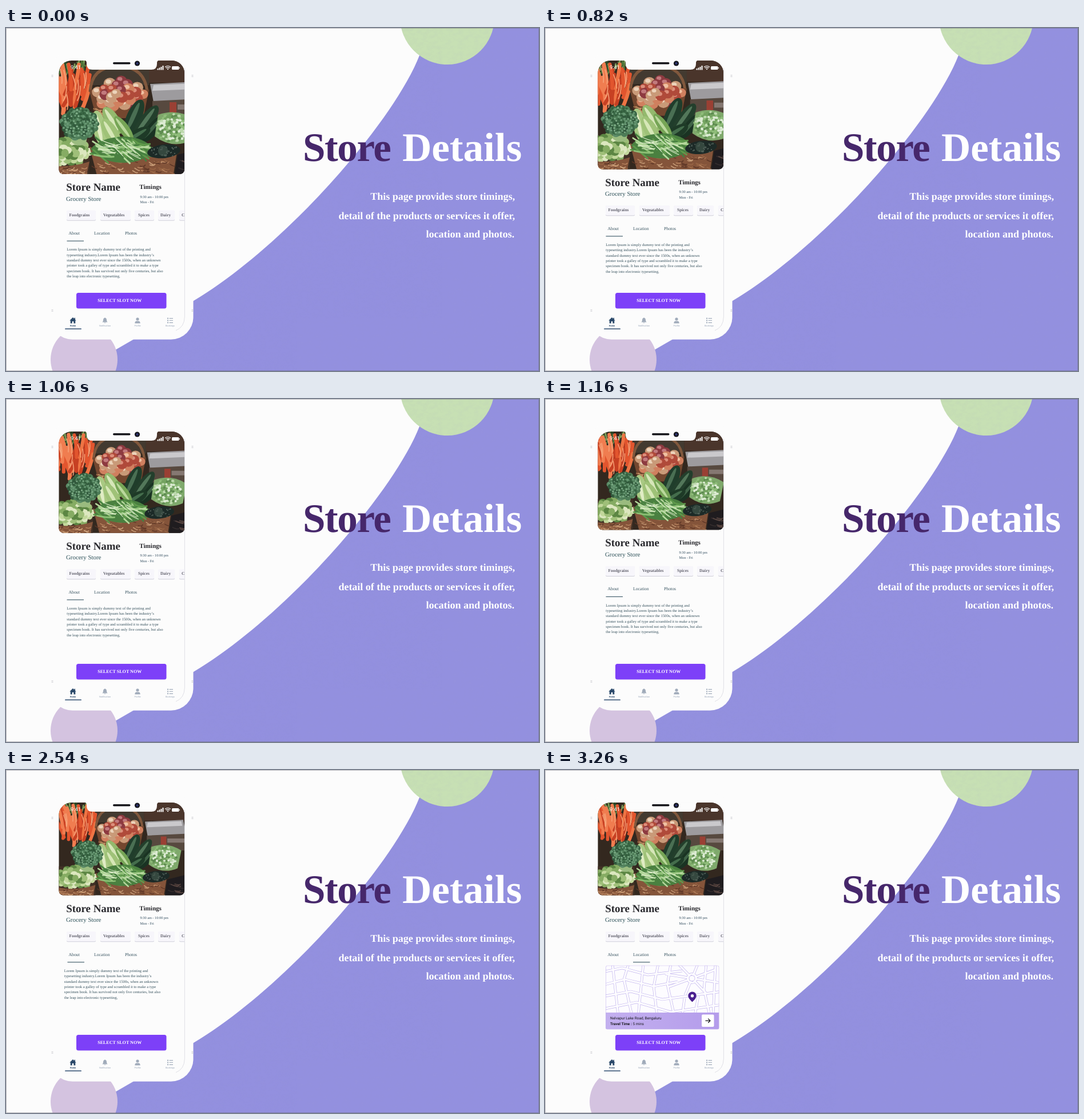
An HTML page for the animation above (6000 ms loop, 932 px wide and 601 px high).

```html
<!DOCTYPE html>
<html lang="en">
<head>
<meta charset="utf-8">
<title>Store Details</title>
<style>
  html, body { margin: 0; width: 100%; height: 100%; overflow: hidden; background: #fcfcfc; }
  svg { display: block; width: 932px; height: 601px; }
  text { font-family: "Liberation Serif", "Times New Roman", serif; text-rendering: geometricPrecision; white-space: pre; }
  .b { font-weight: 700; }
  .sans { font-family: Roboto, Inter, sans-serif; }
  .title { font-size: 71px; font-weight: 700; }
  .lead { font-size: 18px; font-weight: 700; fill: #fff; text-anchor: end; }
  .hours { font-size: 6.25px; fill: #2f4a5c; }
  .chip { font-size: 7.45px; font-weight: 700; fill: #62626d; }
  .tab { font-size: 7.75px; fill: #36525f; }
  .body { font-size: 6.67px; fill: #35505c; }
  .nav { font: 3.9px Roboto, Inter, sans-serif; fill: #98a5b8; text-anchor: middle; }
</style>
</head>
<body>
<svg viewBox="0 0 932 601" xmlns="http://www.w3.org/2000/svg">
  <defs>
    <clipPath id="photoClip"><path id="photoEdge"/></clipPath>
    <clipPath id="screenClip"><rect x="92.5" y="57" width="219.5" height="400"/></clipPath>
    <clipPath id="mapClip"><rect x="106" y="342.5" width="198.5" height="112" rx="3"/></clipPath>
    <clipPath id="roadClip"><rect x="106" y="342.5" width="198.5" height="82.5"/></clipPath>
    <clipPath id="tintClip"><use href="#sweep"/><use href="#sun"/></clipPath>
    <linearGradient id="panel"><stop stop-color="#c3b0ef"/><stop offset="1" stop-color="#b49ceb"/></linearGradient>
    <filter id="grain" x="0" y="0" width="100%" height="100%">
      <feTurbulence type="fractalNoise" baseFrequency=".11 .16" numOctaves="3" seed="4"/>
      <feColorMatrix values="0 0 0 0 .35  0 0 0 0 .33  0 0 0 0 .6  .5 0 0 0 -.2"/>
    </filter>
  </defs>

  <rect width="932" height="601" fill="#fcfcfc"/>
  <path id="sweep" fill="#9390df" d="M742 0Q734 24 723 48C677 166 486 384 328 478Q260 525 193 563L120 601H932V0Z"/>
  <circle id="sun" cx="771.5" cy="-18.5" r="82.5" fill="#c7e0b4"/>
  <rect x="120" width="812" height="601" filter="url(#grain)" clip-path="url(#tintClip)" opacity=".3"/>
  <circle cx="136.5" cy="581" r="58.5" fill="#d4c3e0"/>
  <rect x="77" y="40" width="250.5" height="505.7" rx="39" fill="#fcfcfc"/>
  <rect x=".5" y=".5" width="931" height="600" fill="none" stroke="#60606c" stroke-opacity=".45"/>

  <text class="title" x="519" y="233" fill="#46276b" letter-spacing="-1.4">Store</text>
  <text class="title" x="693" y="233" fill="#fff">Details</text>
  <text class="lead" x="890" y="301">This page provides store timings,</text>
  <text class="lead" x="890" y="335">detail of the products or services it offer,</text>
  <text class="lead" x="889" y="366.5">location and photos.</text>

  <g id="marks" stroke="#c9c9cf" stroke-width=".7"></g>
  <path d="M312.4 70V506Q312 524 297 530" fill="none" stroke="#dcdce3" stroke-width=".9"/>

  <g clip-path="url(#photoClip)"><g id="photo"></g></g>

  <path fill="#fcfcfc" d="M137 56.5Q141 57 141 61V63Q141 73 151 73H254Q264 73 264 63V61Q264 57 268 56.5Z"/>
  <rect x="187" y="60" width="30.5" height="3.5" rx="1.75" fill="#15151a"/>
  <circle cx="229.5" cy="62" r="4.6" fill="#15161f"/><circle cx="229.5" cy="62" r="2.1" fill="#2d3470"/>
  <text class="sans" x="113" y="71.5" font-size="9.3" fill="#fff">9:41</text>
  <g fill="#fff">
    <path d="M264.5 71h2v2.500h-2zM267.500 69.500h2v4h-2zM270.500 68h2v5.500h-2zM273.500 66h2v7.500h-2z"/>
    <rect x="290" y="67" width="12.500" height="6" rx="1.500"/><rect x="303" y="69" width="1" height="2"/>
    <path d="M281.400 71.500L283 73.500L284.600 71.500Q283 70.300 281.400 71.500Z"/>
    <path d="M278 68.500Q283 64.500 288 68.500M279.800 70.300Q283 67.800 286.200 70.300" fill="none" stroke="#fff" stroke-width="1.200"/>
  </g>

  <g clip-path="url(#screenClip)">
    <g id="scroll">
      <text class="b" x="105.300" y="285" font-size="18.900" fill="#29292e">Store Name</text>
      <text x="105" y="302.500" font-size="10.900" fill="#2c5058">Grocery Store</text>
      <text class="b" x="233.300" y="282" font-size="11.100" fill="#29292e">Timings</text>
      <text class="hours" x="234.500" y="297.500">9:30 am - 10:00 pm</text>
      <text class="hours" x="234.500" y="307">Mon - Fri</text>
      <g id="chips"></g>
      <text class="tab" x="109.500" y="362">About</text>
      <text class="tab" x="154" y="362">Location</text>
      <text class="tab" x="208" y="362">Photos</text>
      <rect id="underline" x="106.500" y="372.600" width="29.500" height="1.200" fill="#46626f"/>
      <g id="about"></g>
    </g>
    <g id="location"><g clip-path="url(#mapClip)">
      <rect x="106" y="342.500" width="198.500" height="112" fill="#fdfcff"/>
      <g id="roads" fill="none" clip-path="url(#roadClip)"></g>
      <path d="M257.500 406.500Q250.300 400 250.300 395.700A7.200 7.200 0 0 1 264.700 395.700Q264.700 400 257.500 406.500Z" fill="#4a1f8f"/>
      <circle cx="257.500" cy="395.800" r="2.700" fill="#fff"/>
      <rect x="106" y="425" width="198.500" height="29.500" fill="url(#panel)"/>
      <rect x="106.300" y="342.800" width="197.900" height="111.400" rx="3" fill="none" stroke="#c3b4ee" stroke-width=".7"/>
      <text class="sans" x="114" y="436.500" font-size="6.500" fill="#18181c">Nelvapur Lake Road, Bengaluru</text>
      <text class="sans" x="114" y="447" font-size="6.500" fill="#18181c"><tspan font-weight="600">Travel Time : </tspan>5 mins</text>
      <rect x="274" y="428.500" width="21.500" height="21.500" rx="2" fill="#fff"/>
      <path d="M280.500 439.300H288.700M285.200 435.600L288.900 439.300L285.200 443" fill="none" stroke="#18181c" stroke-width="1.300"/>
    </g></g>
  </g>

  <rect x="123" y="464" width="157.500" height="27.500" rx="3.500" fill="#7d40f8"/>
  <text class="b" x="198.700" y="480.400" font-size="8.050" fill="#fff" text-anchor="middle">SELECT SLOT NOW</text>

  <path d="M111.300 512.500L117 507L119.500 509.400V507.800H121V510.900L122.700 512.500H121.300V517.500H118.300V514H115.700V517.500H112.700V512.500Z" fill="#2c4a6b"/>
  <g fill="#a0abba">
    <path d="M168.500 515.500Q170 514 170 511.500Q170 508.200 173 507.500Q176 508.200 176 511.500Q176 514 177.500 515.500ZM171.600 516.200H174.400Q173 518.500 171.600 516.200Z"/>
    <circle cx="230" cy="510" r="2.600"/>
    <path d="M225.300 517.500Q225.300 513.400 228.500 513.400H231.500Q234.700 513.400 234.700 517.500Z"/>
    <path d="M282 507.800h2v2h-2zM282 511.500h2v2h-2zM282 515.300h2v2h-2zM285.500 508.200h6.500v1.200h-6.500zM285.500 511.900h6.500v1.200h-6.500zM285.500 515.700h6.500v1.200h-6.500z"/>
  </g>
  <text class="nav" x="117" y="522.600" style="fill:#2c4a6b;font-weight:700">Home</text>
  <text class="nav" x="173" y="522.600">Notification</text>
  <text class="nav" x="230" y="522.600">Profile</text>
  <text class="nav" x="287" y="522.600">Bookings</text>
  <rect x="103" y="526.400" width="29" height="1.700" rx=".8" fill="#2f4d70"/>
</svg>
<script>
const $ = id => document.getElementById(id);
let seed = 7;
const rnd = () => (seed = seed * 16807 % 2147483647) / 2147483647;
const between = (a, b) => a + (b - a) * rnd();
const pick = list => list[Math.floor(rnd() * list.length)];

const path = (d, fill, extra = '') => `<path d="${d}" fill="${fill}" ${extra}/>`;
const oval = (x, y, rx, ry, fill, turn = 0) =>
  `<ellipse cx="${x}" cy="${y}" rx="${rx}" ry="${ry}" fill="${fill}" transform="rotate(${turn} ${x} ${y})"/>`;
const many = (n, make) => Array.from({ length: n }, (_, i) => make(i)).join('');

// Round things scattered inside an ellipse, from the rim to the middle.
const heap = (x, y, rx, ry, n, r, colors) => many(n, i => {
  const a = i * 2.4, q = Math.sqrt(1 - (i + .5) / n);
  return oval(x + rx * q * Math.cos(a), y + ry * q * Math.sin(a), r * between(.8, 1.2), r * between(.75, 1.1), pick(colors));
});
// Long thin things scattered in a box, lying at about one angle.
const sticks = (n, x0, x1, y0, y1, len, angle, spread, width, colors) => many(n, () => {
  const a = (angle + between(-spread, spread)) * Math.PI / 180, x = between(x0, x1), y = between(y0, y1);
  const dx = Math.cos(a) * len / 2, dy = Math.sin(a) * len / 2;
  return path(`M${x - dx} ${y - dy}Q${x + 3} ${y + 3} ${x + dx} ${y + dy}`, 'none',
    `stroke="${pick(colors)}" stroke-width="${width}" stroke-linecap="round"`);
});
const gourd = (x, y, rx, ry, turn, dark, light) =>
  oval(x, y, rx, ry, dark, turn) + oval(x - 1.5, y - 1, rx * .3, ry * .8, light, turn);
const bulb = (x, y, r, dark, light) =>
  oval(x, y, r, r * .92, dark) + oval(x - r * .25, y - r * .3, r * .45, r * .35, light);
const basket = (d, x0, x1, y0, y1) => path(d, '#84543a') +
  sticks(46, x0, x1, y0, y1, 9, 8, 22, 1.6, ['#b98560', '#5d3626', '#cda27c', '#9a6746']);

function drawPhoto() {
  const fruit = [['#b04a3a', '#dc8f7c'], ['#d0805f', '#efc0a2'], ['#8d3a40', '#c27a7d'], ['#c99a78', '#ecd3ba']];
  $('photo').innerHTML =
    path('M60 50H345V262H60Z', '#33281f') +
    path('M140 57H250V100H140Z', '#433a30') + path('M250 57H345V96H250Z', '#4a352b') +
    sticks(20, 64, 140, 56, 82, 20, 70, 50, 3, ['#4f7338', '#7d9c58', '#2e4b29']) +
    sticks(18, 70, 104, 84, 128, 44, 78, 14, 7, ['#e2552e', '#cb4325', '#f07d50']) +
    sticks(16, 108, 142, 82, 126, 44, 98, 16, 6.5, ['#e2552e', '#c74023', '#ee7444']) +
    sticks(12, 76, 140, 84, 130, 26, 86, 16, 1.6, ['#f7a67c']) +
    path('M147 112Q150 66 196 68Q242 66 247 112', 'none', 'stroke="#80583d" stroke-width="5"') +
    path('M145 108H250L240 158H158Z', '#74472f') +
    many(26, i => {
      const a = i * 2.4, q = Math.sqrt(1 - (i + .5) / 26);
      return bulb(198 + 42 * q * Math.cos(a), 116 + 25 * q * Math.sin(a), between(8, 11), ...pick(fruit));
    }) +
    sticks(24, 156, 190, 142, 154, 10, 5, 15, 2, ['#a97650', '#5b3624', '#c39668']) +
    path('M252 98L334 94L340 126L258 130Z', '#9d9b9e') + path('M258 100L330 97L332 107L256 110Z', '#cac9cc') +
    path('M256 128L340 124V160H256Z', '#57493f') + path('M286 130h12v18h-12z', '#9a4034') +
    path('M300 134H340V143H300Z', '#857872') +
    gourd(224, 156, 13, 33, 24, '#203d2b', '#4a6f53') + gourd(245, 164, 12, 34, 36, '#233f2c', '#53775a') +
    gourd(258, 176, 10, 30, 40, '#1a3323', '#3f6247') + gourd(228, 190, 11, 28, 58, '#1e3a27', '#446d4c') +
    gourd(186, 162, 12, 27, -32, '#93b96d', '#d6e6b9') + gourd(164, 176, 12, 32, -12, '#a9c983', '#e0ecc4') +
    gourd(184, 184, 12, 28, -30, '#9fc278', '#d6e7b7') + gourd(206, 176, 9, 26, -36, '#76a556', '#bad89c') +
    path('M266 152Q300 140 330 160L322 198Q290 212 260 190Z', '#7fa96c') +
    heap(291, 175, 28, 24, 110, 2.8, ['#8fbd7a', '#bddaad', '#5e8c50', '#dcebd3', '#74a361']) +
    path('M60 194H146V262H60Z', '#403025') +
    heap(103, 217, 42, 22, 54, 7, ['#86ac63', '#c2d79b', '#5c8643', '#dce7bf', '#9fbf79']) +
    basket('M60 238Q105 248 146 234L140 262H60Z', 66, 140, 244, 256) +
    path('M116 178L145 180L139 204Q125 209 115 200Z', '#9abb7f') +
    heap(128, 168, 29, 25, 80, 6.500, ['#3b6846', '#4d7c57', '#31583c', '#5b8b66']) +
    heap(128, 166, 31, 25, 90, 1.800, ['#6a9a76', '#315c3b', '#7cab85']) +
    basket('M146 208Q220 238 300 210L292 262H160Z', 154, 294, 232, 254) +
    path('M148 212Q164 192 206 190Q246 192 258 214Q240 238 200 236Q166 234 148 212Z', '#4a8040') +
    sticks(44, 164, 242, 199, 227, 34, 20, 34, 3, ['#5f9a4b', '#8fc077', '#b5d89c', '#467f40']) +
    sticks(16, 168, 238, 200, 224, 24, 20, 30, 1.200, ['#dcecca']) +
    gourd(276, 216, 29, 12, -6, '#1c2a27', '#35483f') +
    many(36, () => oval(between(254, 299), between(208, 225), 1.200, .9, '#53635b')) +
    path('M300 222L340 212V262H294Z', '#1f1c1f') +
    sticks(10, 304, 330, 230, 250, 12, 8, 10, 2, ['#57443f', '#332c2d']);
}

function drawDetails() {
  $('marks').innerHTML = [[81, 84], [326, 84], [81, 495], [326, 495]].map(([x, y]) =>
    path(`M${x - 1.5} ${y - 1.5}h3M${x - 1.5} ${y}h3M${x - 1.5} ${y + 1.5}h3`, 'none')).join('');

  const chips = [['Foodgrains', 106, 51, 110.5], ['Vegeatables', 165, 53, 170], ['Spices', 225, 34, 231],
    ['Dairy', 266, 29, 270], ['C', 303, 30, 307]];
  $('chips').innerHTML = chips.map(([label, x, w, tx]) =>
    `<rect x="${x}" y="320.5" width="${w}" height="17.2" rx="2" fill="#cfcfd9"/>` +
    `<rect x="${x}" y="319.5" width="${w}" height="17.2" rx="2" fill="#f7f6fb"/>` +
    `<text class="chip" x="${tx}" y="329.7">${label}</text>`).join('');

  const lines = ['Lorem Ipsum is simply dummy text of the printing and',
    'typesetting industry.Lorem Ipsum has been the industry’s',
    'standard dummy text ever since the 1500s, when an unknown',
    'printer took a galley of type and scrambled it to make a type',
    'specimen book. It has survived not only five centuries, but also',
    'the leap into electronic typesetting,'];
  $('about').innerHTML = lines.map((line, i) =>
    `<text class="body" x="106.3" y="${390.3 + i * 9.35}">${line}</text>`).join('');

  const streets = 'M100 354L135 347L180 359L240 352M100 377L140 367L190 379L232 371M100 397L150 388L205 402L310 388' +
    'M100 419L160 407L220 424L310 411M118 340L128 430M146 340L138 367L152 430M172 340L163 430' +
    'M198 340L190 379L196 430M220 340L214 376L226 430M282 340L278 384L288 430M298 340L294 430M244 400L240 430M268 396L262 430';
  const spokes = many(8, i => {
    const a = i * Math.PI / 4 + .25;
    return `M257 365l${Math.cos(a) * 48} ${Math.sin(a) * 30}`;
  });
  const ring = '<circle cx="257" cy="365" r="7.5"/>';
  const layer = (color, width) =>
    `<g stroke="${color}" stroke-width="${width}"><path d="${streets}${spokes}"/>${ring}</g>`;
  $('roads').innerHTML = layer('#c3b6ee', 4.6) + layer('#fdfcff', 3.2) +
    '<circle cx="257" cy="365" r="5" fill="#fdfcff" stroke="#c3b6ee" stroke-width=".8"/>';
}

const LOOP = 6000, STEP = 20, LIFT = 36.5, PAGE = 220, TAB_GAP = 47.5;
const progress = (t, start, end) => Math.min(1, Math.max(0, (t - start) / (end - start)));
const shift = (id, x, y) => $(id).setAttribute('transform', `translate(${x} ${y})`);

function render(time) {
  // The small lead absorbs clock rounding at the step edges.
  const t = Math.floor((time + 2) % LOOP / STEP) * STEP;
  const lift = LIFT * progress(t, 665, 1340);
  const swap = progress(t, 2525, 3260);
  const bottom = 256 - lift, scale = (bottom - 57) / 199;

  $('photoEdge').setAttribute('d', `M92.5 79a22 22 0 0 1 22 -22H290a22 22 0 0 1 22 22V${bottom - 8}` +
    `a8 8 0 0 1 -8 8H100.5a8 8 0 0 1 -8 -8Z`);
  $('photo').setAttribute('transform', `translate(202.3 57) scale(${scale}) translate(-202.3 -57)`);
  shift('scroll', 0, -lift);
  shift('underline', TAB_GAP * swap, 0);
  shift('about', -PAGE * swap, 0);
  shift('location', PAGE * (1 - swap), 0);
}

drawPhoto();
drawDetails();
const begin = performance.now();
function tick() {
  render(performance.now() - begin);
  requestAnimationFrame(tick);
}
tick();
</script>
</body>
</html>
```
